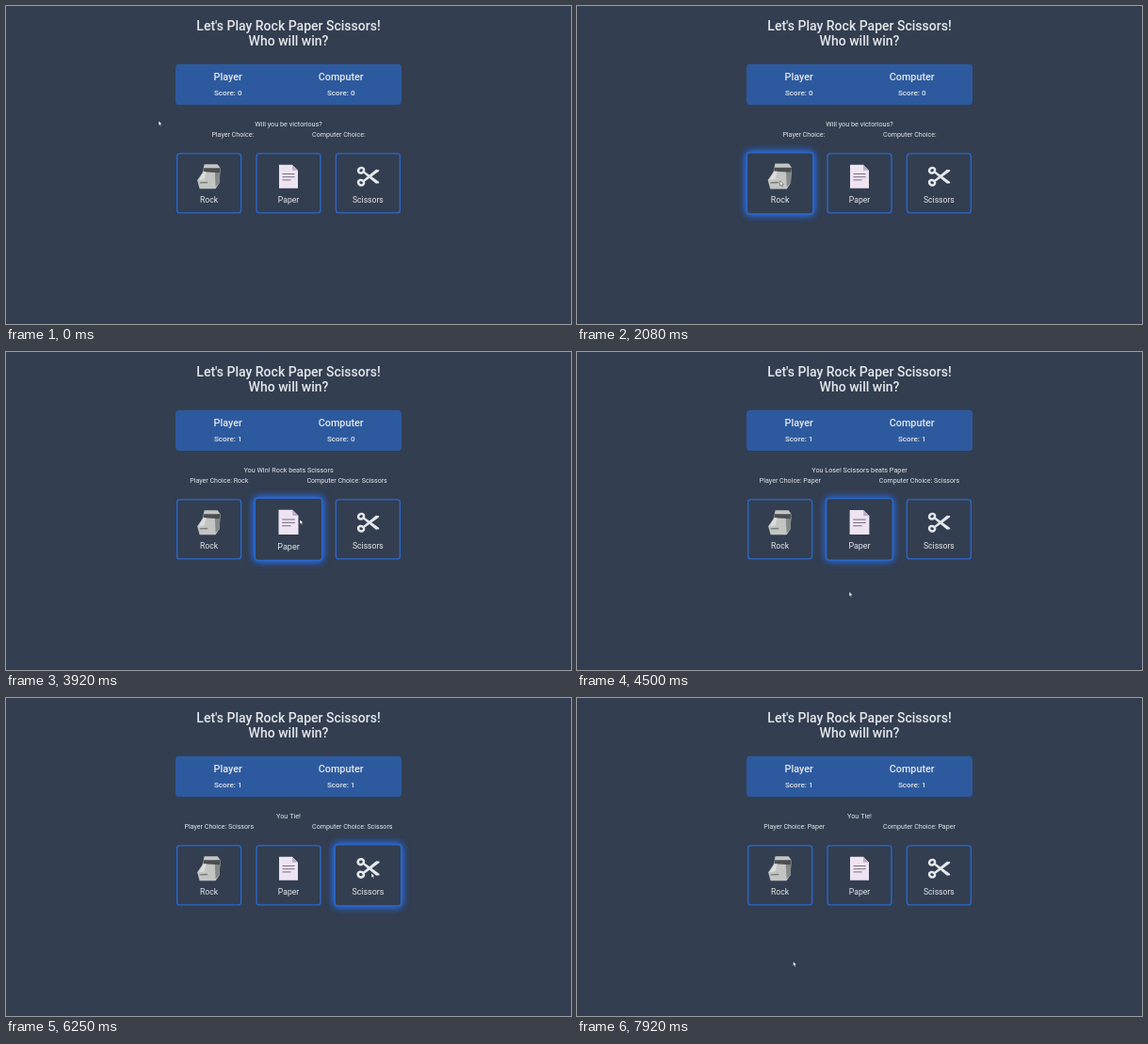
Recreate the animation shown at these times as an HTML page with a canvas. Size 600 by 338 pixels, loop 8 s.

```html
<!DOCTYPE html>
<html lang="en">
<head>
<meta charset="utf-8">
<title>Rock Paper Scissors</title>
<style>
html, body { margin: 0; width: 100%; height: 100%; overflow: hidden; background: #333e50; }
canvas { display: block; width: 600px; height: 338px; }
</style>
</head>
<body>
<canvas id="stage"></canvas>
<script>
const W = 600, H = 338, LOOP = 8000, MID = W / 2;
const BG = '#333e50', INK = '#e4e7eb', BLUE = '#2b68cb';
const CARD_W = 68, CARD_H = 63, CARD_Y = 188.4, CARD_STEP = 84.4;
const FLICK = 170, FADE = 140, PRESS = 80;

const canvas = document.getElementById('stage');
const ctx = canvas.getContext('2d');
const dpr = window.devicePixelRatio || 1;
canvas.width = W * dpr;
canvas.height = H * dpr;

const cards = [['Rock', drawRock], ['Paper', drawPaper], ['Scissors', drawScissors]]
  .map(([name, icon], i) => ({ name, icon, x: MID + (i - 1) * CARD_STEP }));

// The cursor sets off, reaches its aim, clicks, then flicks away to rest
const home = { x: 162, y: 122 };
const rounds = [
  { go: 200, arrive: 1400, click: 2100, aim: { x: 215.6, y: 186 }, rest: { x: 229, y: 242 }, pick: ['Rock', 'Scissors'] },
  { go: 3330, arrive: 3880, click: 4350, aim: { x: 312, y: 178 }, rest: { x: 276, y: 298 }, pick: ['Paper', 'Scissors'] },
  { go: 5400, arrive: 5750, click: 6220, aim: { x: 388, y: 186 }, rest: { x: 345, y: 281 }, pick: ['Scissors', 'Scissors'] },
  { go: 6520, arrive: 6820, click: 7680, aim: { x: 301, y: 184 }, rest: { x: 229.5, y: 280 }, pick: ['Paper', 'Paper'] }
];
const beats = { Rock: 'Scissors', Paper: 'Rock', Scissors: 'Paper' };

const clamp = v => Math.max(0, Math.min(1, v));
const smooth = v => v * v * (3 - 2 * v);
const ramp = (t, a, b) => smooth(clamp((t - a) / (b - a)));
const mix = (a, b, k) => a + (b - a) * k;

// Height leads on the way to a card, so the path bends
function cursorAt(t) {
  let { x, y } = home;
  for (const r of rounds) {
    const k = ramp(t, r.go, r.arrive);
    const out = ramp(t, r.click + 50, r.click + 50 + FLICK);
    x = mix(mix(x, r.aim.x, k * k), r.rest.x, out);
    y = mix(mix(y, r.aim.y, k), r.rest.y, out);
  }
  return { x, y };
}

function isOver(card, t) {
  const p = cursorAt(t);
  return Math.abs(p.x - card.x) < CARD_W / 2 && Math.abs(p.y - CARD_Y) < CARD_H / 2;
}

// Share of the recent past spent over the card: a fade without state
function hoverAmount(card, t) {
  const n = 14;
  let hits = 0;
  for (let i = 0; i < n; i++) hits += isOver(card, t - i * FADE / n);
  return smooth(hits / n);
}

function gameAt(t) {
  const score = [0, 0];
  let msg = 'Will you be victorious?', pick = ['', ''];
  for (const r of rounds.filter(r => t >= r.click)) {
    const [me, pc] = pick = r.pick;
    if (me === pc) msg = 'You Tie!';
    else if (beats[me] === pc) { score[0]++; msg = `You Win! ${me} beats ${pc}`; }
    else { score[1]++; msg = `You Lose! ${pc} beats ${me}`; }
  }
  return { score, msg, pick };
}

function font(size, weight) {
  ctx.font = `${weight} ${size}px Roboto, "Open Sans", sans-serif`;
}

function text(str, x, y, size, weight = 400) {
  font(size, weight);
  ctx.textAlign = 'center';
  ctx.fillStyle = INK;
  ctx.fillText(str, x, y);
}

// Two strings side by side, centred as a pair
function pair(a, b, y, size, gap) {
  font(size, 400);
  const wa = ctx.measureText(a).width, wb = ctx.measureText(b).width;
  text(a, MID - (wb + gap) / 2, y, size);
  text(b, MID + (wa + gap) / 2, y, size);
}

function box(x, y, w, h, r) {
  ctx.beginPath();
  ctx.roundRect(x, y, w, h, r);
}

function poly(color, ...pts) {
  ctx.beginPath();
  for (let i = 0; i < pts.length; i += 2) ctx.lineTo(pts[i], pts[i + 1]);
  ctx.closePath();
  ctx.fillStyle = color;
  ctx.fill();
}

// Icons are drawn around (0, 0)
function drawRock() {
  poly('#c3c5c3', -5, -13, 9, -13, 12, -9, 11, 7, 7, 13, -10, 13, -12.5, 4, -7, -4);
  poly('#858987', 6, -8, 12, -9, 11, 7, 7, 11);
  poly('#4a4e50', -6, -9, 12, -9, 11, -4, -6, -5);
  poly('#dcdddb', -6, -5, -3, -5, -5, 3, -11, 4);
  poly('#777b7a', -10, 6, -2, 5.5, -1, 7, -10, 7.2);
}

function drawPaper() {
  poly('#eee4f1', -10, -12.5, 4, -12.5, 10, -6.5, 10, 12.5, -10, 12.5);
  poly('#bcaec5', 4, -12.5, 10, -6.5, 4, -6.5);
  ctx.fillStyle = '#796d85';
  for (let i = 0; i < 3; i++) ctx.fillRect(-6.5, -3.2 + i * 3.2, i < 2 ? 13 : 9, 1);
}

function drawScissors() {
  for (const s of [-1, 1]) {
    ctx.save();
    ctx.scale(1, s);
    ctx.beginPath();
    ctx.ellipse(-7.3, 6.5, 3.1, 2.7, 0.5, 0, Math.PI * 2);
    ctx.strokeStyle = INK;
    ctx.lineWidth = 2.5;
    ctx.stroke();
    poly(INK, -6, 4.5, 8.5, -7.5, 12, -7, 11.5, -5.5, -4, 5.8);
    ctx.restore();
  }
}

function drawCard(card, t) {
  const k = hoverAmount(card, t);
  const press = Math.max(...rounds.map(r => clamp(1 - Math.abs(t - r.click) / PRESS)));
  const s = 1 + k * (0.05 - 0.02 * press);
  ctx.save();
  ctx.translate(card.x, CARD_Y);
  ctx.scale(s, s);
  box(-CARD_W / 2, -CARD_H / 2, CARD_W, CARD_H, 3);
  ctx.save();
  ctx.shadowColor = `rgba(40, 112, 245, ${k})`;
  ctx.shadowBlur = 8 * dpr;
  ctx.fillStyle = BG;
  ctx.fill();
  ctx.fill();
  ctx.restore();
  ctx.strokeStyle = BLUE;
  ctx.lineWidth = 1.4;
  ctx.stroke();
  text(card.name, 0, 20.2, 8.6);
  ctx.translate(0, -7.2);
  card.icon();
  ctx.restore();
}

function drawCursor(t) {
  const { x, y } = cursorAt(t);
  ctx.save();
  ctx.translate(x, y);
  ctx.scale(1.15, 1.15);
  poly('#ffffff', 0, 0, 0, 4.4, 1, 3.5, 1.8, 5.2, 2.5, 4.8, 1.8, 3.2, 3.2, 3.1);
  ctx.strokeStyle = '#161b24';
  ctx.lineWidth = 0.35;
  ctx.stroke();
  ctx.restore();
}

function draw(t) {
  const { score, msg, pick } = gameAt(t);
  ctx.setTransform(dpr, 0, 0, dpr, 0, 0);
  ctx.fillStyle = BG;
  ctx.fillRect(0, 0, W, H);

  text("Let's Play Rock Paper Scissors!", MID, 25.6, 14, 500);
  text('Who will win?', MID, 42.2, 14, 500);

  box(180, 61.7, 240, 43.2, 4);
  ctx.fillStyle = '#2d5a9e';
  ctx.fill();
  ['Player', 'Computer'].forEach((who, i) => {
    const x = 235.7 + i * 120;
    text(who, x, 79.2, 10.8, 500);
    text('Score: ' + score[i], x, 95.3, 8.1, 500);
  });

  text(msg, MID, 127.6, 7.25);
  pair(`Player Choice: ${pick[0]}`.trim(), `Computer Choice: ${pick[1]}`.trim(), 138.8, 7.1, 62);

  cards.forEach(card => drawCard(card, t));
  drawCursor(t);
}

const start = performance.now();
function tick() {
  draw((performance.now() - start) % LOOP);
  requestAnimationFrame(tick);
}
tick();
</script>
</body>
</html>
```
